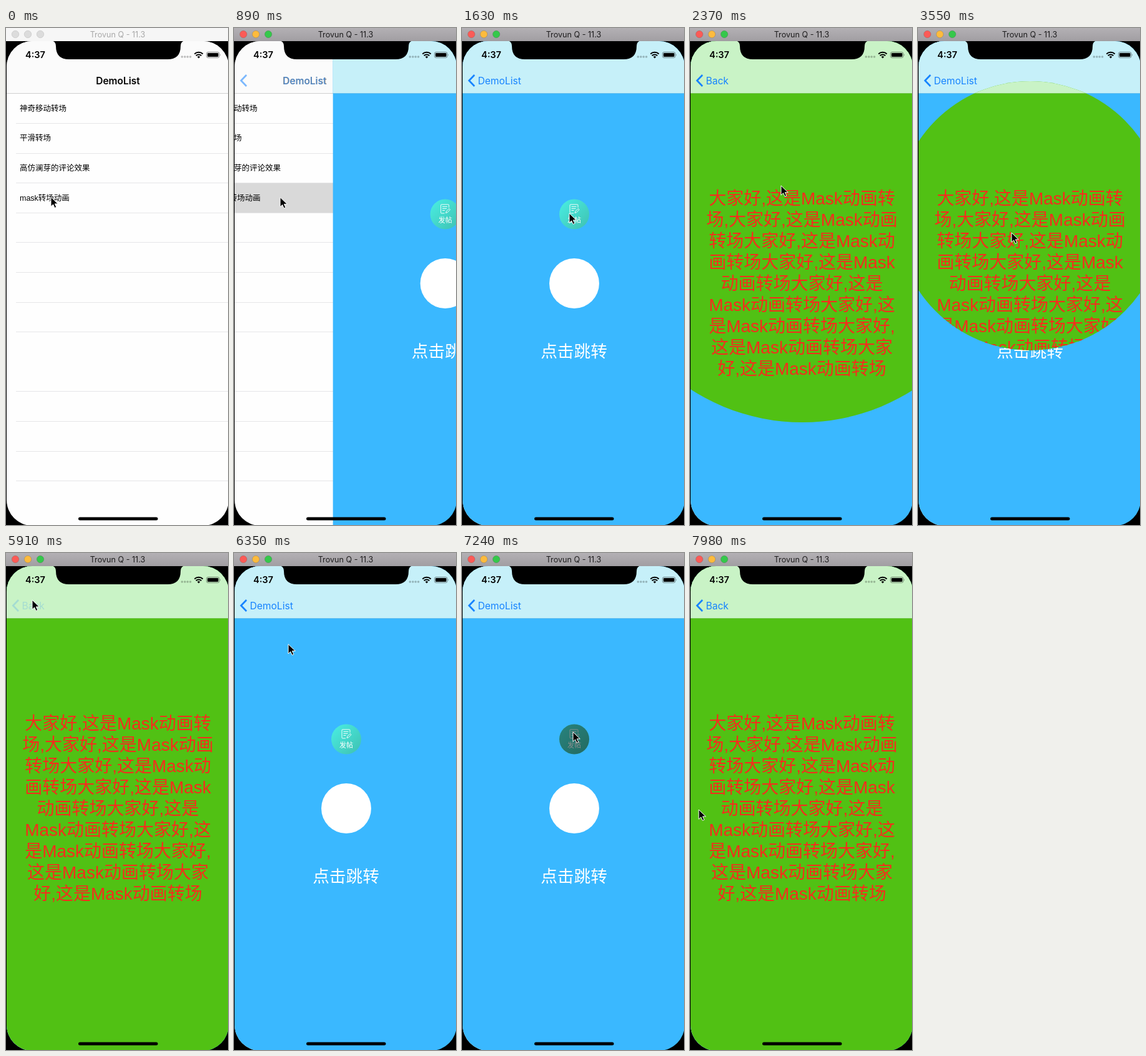
Write an HTML page that moves like this. It is 356 px wide and 794 px high and loops after 8000 ms.

```html
<!DOCTYPE html>
<html lang="zh-CN">
<head>
<meta charset="utf-8">
<title>Mask transition</title>
<style>
  html, body { margin: 0; width: 100%; height: 100%; overflow: hidden; background: #000; }
  svg { display: block; }
  text { font-family: "Liberation Sans", "Noto Sans CJK SC", "Noto Sans CJK", sans-serif; }
  .ui { font-family: Inter, sans-serif; }
  .mid { text-anchor: middle; }
</style>
</head>
<body>
<svg width="356" height="794" viewBox="0 0 356 794">
  <defs>
    <clipPath id="screen"><rect x="1" y="21" width="356" height="774" rx="41"/></clipPath>
    <clipPath id="mask"><circle id="hole" cx="180"/></clipPath>
    <linearGradient id="teal" x2="1" y2="1">
      <stop offset=".1" stop-color="#48eadf"/><stop offset=".9" stop-color="#40c5b5"/>
    </linearGradient>
    <linearGradient id="chrome" x2="0" y2="1">
      <stop stop-color="#b3b0b4"/><stop offset="1" stop-color="#a19ea2"/>
    </linearGradient>
  </defs>

  <rect id="bar" width="356" height="21"/>
  <g id="lights" stroke-width=".7"></g>
  <text id="caption" class="ui mid" x="179" y="15" font-size="12.6">Trovun Q - 11.3</text>

  <g clip-path="url(#screen)">
    <g id="listPage">
      <rect y="21" width="357" height="773" fill="#fefefe"/>
      <rect y="21" width="357" height="83" fill="#fbfbfb"/>
      <rect y="104" width="357" height="1" fill="#cfcfcf"/>
      <rect id="pressedRow" y="247" width="357" height="48" fill="#d9d9d9"/>
      <g id="rows" font-size="12.5"></g>
    </g>

    <g id="bluePage">
      <rect y="21" width="357" height="773" fill="#3ab8ff"/>
      <rect y="21" width="357" height="83" fill="#c6f0f9"/>
      <rect y="104" width="357" height=".6" fill="#7fc4e4"/>
      <g fill="none" stroke="#fff" stroke-width=".9">
        <circle cx="180" cy="297.5" r="24" fill="url(#teal)" stroke="none"/>
        <path d="M186 287v-4q0-1-1-1h-11q-1 0-1 1v12q0 1 1 1h5M175.500 285.500h8M175.500 288.500h7M175.500 291.500h4M181 295.500l1-3 4.500-4 1.500 1.800-4.500 4.400z"/>
        <text class="mid" x="180" y="311" font-size="11" fill="#fff" stroke="none">发帖</text>
        <circle id="shade" cx="180" cy="297.500" r="24" fill="#000" opacity=".45" stroke="none"/>
      </g>
      <circle cx="180" cy="408" r="40" fill="#fff"/>
      <text id="jump" class="mid" x="179.500" y="526" font-size="26.700" font-weight="300" fill="#fff">点击跳转</text>
    </g>

    <g clip-path="url(#mask)">
      <rect y="21" width="357" height="773" fill="#51c114"/>
      <rect y="21" width="357" height="83" fill="#c9f3c6"/>
      <rect y="104" width="357" height=".6" fill="#84c96a"/>
      <g id="message" font-size="28" fill="#f52d1c"></g>
    </g>

    <text id="title" class="ui mid" y="90" font-size="15.500" font-weight="600">DemoList</text>
    <g id="nav" class="ui" font-size="15.600" fill="#1683ff">
      <path d="M20 75l-8.700 9 8.700 9" fill="none" stroke="#1683ff" stroke-width="2.700"/>
      <text id="toList" class="ui" y="90">DemoList</text>
      <text id="toBack" class="ui" x="25.500" y="90">Back</text>
    </g>

    <text class="ui" x="31" y="48" font-size="14.500" font-weight="600">4:37</text>
    <g fill="#000" opacity=".25">
      <circle cx="282.300" cy="46" r="1.800"/><circle cx="286.800" cy="46" r="1.800"/>
      <circle cx="291.200" cy="46" r="1.800"/><circle cx="295.600" cy="46" r="1.800"/>
    </g>
    <path d="M302.300 41.500a9.600 9.600 0 0 1 13.400 0M304.700 44.200a6.200 6.200 0 0 1 8.600 0" fill="none" stroke="#000" stroke-width="2"/>
    <path d="M309 48.500l-2.300-2.400a3.300 3.300 0 0 1 4.600 0z"/>
    <rect x="321.500" y="38.500" width="20.500" height="9" rx="2.500" fill="none" stroke="#000" stroke-opacity=".45"/>
    <rect x="323" y="40" width="17.500" height="6" rx="1.200"/>
    <path d="M343 41.300q1.500 1.700 0 3.400z" opacity=".5"/>
    <path d="M72 20q8 1 8 9q0 21 21 21h158q21 0 21-21q0-8 8-9z"/>
    <rect x="116" y="781.500" width="127.500" height="5" rx="2.500"/>
  </g>

  <path id="cursor" d="M0 0v15.300l3.600-3.400 2.500 5.500 2.700-1.200-2.500-5.300h5z" stroke="#fff" stroke-width="1"/>
</svg>

<script>
const LOOP = 8000, TICK = 147.8;
const $ = id => document.getElementById(id);
const set = (id, attrs) => { for (const a in attrs) $(id).setAttribute(a, attrs[a]); };

$('rows').innerHTML = ['神奇移动转场', '平滑转场', '高仿澜芽的评论效果', 'mask转场动画']
  .map((label, i) => `<text x="22" y="${132.7 + i * 47.6}">${label}</text>`).join('') +
  Array.from({ length: 13 }, (_, i) => i === 8 ? '' :
    `<rect x="16" y="${Math.round(152 + i * 47.6)}" width="341" height="1" fill="#e6e6e8"/>`).join('');

$('message').innerHTML = ['大家好,这是Mask动画转', '场,大家好,这是Mask动画', '转场大家好,这是Mask动',
  '画转场大家好,这是Mask', '动画转场大家好,这是', 'Mask动画转场大家好,这', '是Mask动画转场大家好,',
  '这是Mask动画转场大家', '好,这是Mask动画转场']
  .map((line, i) => `<text class="mid" x="179.5" y="${282 + i * 34}">${line}</text>`).join('');

$('lights').innerHTML = [15, 35, 55].map(x => `<circle cx="${x}" cy="10" r="5.700"/>`).join('');
const lightColors = ['#fc5b57', '#fdbb3d', '#35c84b'];

// Keys are [tick, ...values]; values between keys are linear.
function track(keys, k) {
  const i = keys.findIndex(key => key[0] > k);
  if (i === 0) return keys[0].slice(1);
  if (i < 0) return keys[keys.length - 1].slice(1);
  const a = keys[i - 1], b = keys[i], p = (k - a[0]) / (b[0] - a[0]);
  return a.slice(1).map((v, j) => v + (b[j + 1] - v) * p);
}

const pointer = [[5, 72, 270], [7, 76, 271], [11, 172, 296], [15, 172, 296], [20, 42, 75],
  [22, 42, 75], [24, 150, 327], [29, 182, 508], [30, 183, 509], [32, 182, 507], [33, 178, 477],
  [38, 42, 75], [41, 42, 75], [47, 177, 287], [49, 178, 286], [50, 178, 286], [54, 14, 410]];

// Mask radius and opacity of the "Back" label.
const reveal = [[14, 0, 0], [15, 90, .5], [16, 330, 1], [17, 530, 1], [22, 530, 1], [23, 400, .5],
  [24, 215, 0], [25, 24, 0], [26, 0, 0], [32, 0, 0], [33, 286, .5], [34, 500, 1], [40, 500, 1],
  [41, 330, .5], [42, 120, 0], [43, 0, 0], [49, 0, 0], [50, 90, .5], [51, 330, 1], [52, 530, 1]];

const show = on => on ? 'visible' : 'hidden';

function draw(k) {
  const active = k >= 5;
  const push = 1 - (1 - Math.min(1, Math.max(0, (k - 5) / 3))) ** 2;
  const [radius, back] = track(reveal, k);
  const [x, y] = track(pointer, k);

  set('bar', { fill: active ? 'url(#chrome)' : '#f6f6f6' });
  set('caption', { fill: active ? '#1d1c1d' : '#a8a8a8' });
  [...$('lights').children].forEach((dot, i) => {
    dot.setAttribute('fill', active ? lightColors[i] : '#dcdcdc');
    dot.setAttribute('stroke', active ? '#0003' : '#c6c6c6');
  });

  set('listPage', { transform: `translate(${-107 * push})` });
  set('bluePage', { transform: `translate(${357 * (1 - push)})` });
  set('pressedRow', { visibility: show(active) });
  set('shade', { visibility: show(k === 14 || k === 49) });
  set('jump', { opacity: k === 32 ? .3 : 1 });
  set('hole', { r: radius, cy: k > 30 && k < 45 ? 407 : 300 });

  set('title', { x: 179.5 - 119 * push, opacity: 1 - push });
  set('nav', { opacity: k === 22 || k === 40 ? .2 : push });
  set('toList', { x: 25.5 + 119 * (1 - push), opacity: 1 - back });
  set('toBack', { opacity: back });
  set('cursor', { transform: `translate(${x} ${y})` });
}

function frame() {
  draw(Math.floor((performance.now() % LOOP + 5) / TICK));
  requestAnimationFrame(frame);
}
frame();
</script>
</body>
</html>
```
